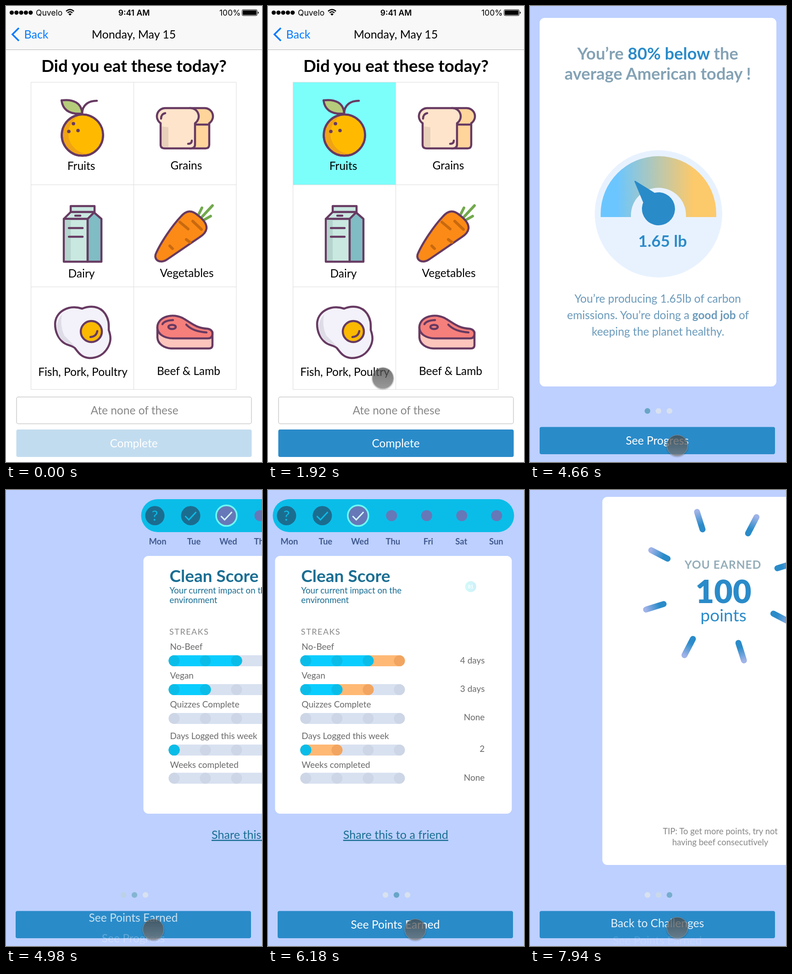
These frames come from a looping animation (558 px wide and 996 px high, 8000 ms). An HTML page:

```html
<!DOCTYPE html>
<html lang="en">
<head>
<meta charset="utf-8">
<title>Food diary</title>
<style>
  html, body { margin: 0; width: 100%; height: 100%; overflow: hidden; background: #fff; }
  svg { display: block; width: 100%; height: 100%; font-family: Lato, sans-serif; }
  .status { font-family: Inter, sans-serif; }
  .icons { stroke: #673a62; stroke-width: 4.5; stroke-linejoin: round; stroke-linecap: round; fill: none; }
</style>
</head>
<body>
<svg id="stage" viewBox="0 0 558 996"></svg>
<script>
const LOOP = 8000, PAGE = 1116;
const BLUE = '#2a8bc9', TEAL = '#1a6e93', CYAN = '#0abde8';

const bold = 'font-weight="700"';
const leftText = (x, y, size, fill, str, extra = '') =>
  `<text x="${x}" y="${y}" font-size="${size}" fill="${fill}" ${extra}>${str}</text>`;
const text = (x, y, size, fill, str, extra = '') =>
  leftText(x, y, size, fill, str, 'text-anchor="middle" ' + extra);
const rect = (x, y, w, h, r, fill, extra = '') =>
  `<rect x="${x}" y="${y}" width="${w}" height="${h}" rx="${r}" fill="${fill}" ${extra}/>`;
const circle = (x, y, r, fill, extra = '') =>
  `<circle cx="${x}" cy="${y}" r="${r}" fill="${fill}" ${extra}/>`;
const path = (d, fill = 'none', extra = '') => `<path d="${d}" fill="${fill}" ${extra}/>`;
const list = (items, draw) => items.map(draw).join('');

const defs = `<defs>
  <linearGradient id="dial"><stop offset=".14" stop-color="#6bc6ff"/><stop offset=".8" stop-color="#fcc96b"/></linearGradient>
  <linearGradient id="ray" gradientUnits="userSpaceOnUse" x1="0" y1="-171" x2="0" y2="-130">
    <stop stop-color="#a0b3e8"/><stop offset=".75" stop-color="${BLUE}"/></linearGradient>
  <linearGradient id="score"><stop stop-color="#5df1e7"/><stop offset="1" stop-color="#53c8ee"/></linearGradient>
  <linearGradient id="touch" x2="0" y2="1"><stop stop-color="#484848"/><stop offset="1" stop-color="#777"/></linearGradient>
  <filter id="shadow" x="-30%" y="-30%" width="160%" height="160%"><feDropShadow dx="0" dy="1" stdDeviation="1.5" flood-opacity=".5"/></filter>
  <clipPath id="fruitClip"><circle cx="166.5" cy="282" r="45"/></clipPath>
</defs>`;

const statusBar = `
  ${rect(0, 0, 558, 95, 0, '#f8f8f8')}${rect(0, 95, 558, 1, 0, '#b2b2b2')}
  ${list([0, 1, 2, 3, 4], i => circle(12.5 + i * 10.3, 14.5, 4.6, '#000'))}
  <g class="status">
    ${leftText(65, 21, 17.5, '#000', 'Quvelo')}
    ${text(279, 21, 17.5, '#000', '9:41 AM', 'font-weight="600"')}
    ${leftText(465, 21, 17.5, '#000', '100%')}
  </g>
  ${path('M131 11.5Q139.5 4 148 11.5M134.2 14.8Q139.5 10.3 144.8 14.8', 'none', 'stroke="#000" stroke-width="2.4"')}
  ${path('M139.5 21L136 17.5Q139.5 14.5 143 17.5Z', '#000')}
  ${rect(514.5, 8, 33, 13, 2.5, 'none', 'stroke="#000"')}${rect(516, 9.5, 30, 10, 1, '#000')}
  ${path('M549 12v5q2-.5 2-2.5t-2-2.5', '#000')}
  ${path('M28 48L14 62L28 76', 'none', 'stroke="#007aff" stroke-width="3.6"')}
  ${leftText(39.5, 71, 25, '#007aff', 'Back')}
  ${text(278.5, 71, 25, '#000', 'Monday, May 15')}`;

const fruit = `
  ${circle(166.5, 282, 45, '#efa315')}
  <g clip-path="url(#fruitClip)" stroke="none">${circle(180, 279, 44, '#ffba00')}</g>
  ${circle(166.5, 282, 45, 'none')}
  ${list([[147, 257], [137, 274], [157, 272]], ([x, y]) => circle(x, y, 3.8, '#673a62', 'stroke="none"'))}
  ${path('M121 206C146 203 165 211 166 235C141 237 124 229 121 206Z', '#b5cc7b')}
  ${path('M166 235C166 216 180 207 198 207')}`;

const bread = `
  ${path('M400 223H432A18 18 0 0 1 443 256V303Q443 311 435 311H400Z', '#ffd59b')}
  ${path('M348 223H402A18 18 0 0 1 412 256V302Q412 311 403 311H346Q337 311 337 303V256A18 18 0 0 1 348 223Z', '#fde4cb')}
  ${path('M340 263V303Q340 308 345 308H354V265Z', '#e9d0bb', 'stroke="none"')}
  ${path('M338 246Q338 236 347 234M397 301Q405 301 405 294M415 259H443')}`;

const milk = `
  ${path('M141 437H193V450H141Z', '#c9e8e0')}
  ${path('M126 465L141 450H193L178 465Z', '#c9e8e0')}
  ${path('M126 465H178V558.5H126Z', '#c9e8e0')}
  ${path('M178 465L192 451L208 465V558.5H178Z', '#80bcc3')}
  ${path('M129 467h12v89h-12Z', '#b4d4cd', 'stroke="none"')}
  ${path('M137 485H167M137 504H167M151 458H162')}`;

const carrot = `
  ${path('M418 459L427 441M424 464L450 436M432 467L446 459', 'none', 'stroke="#72a94c" stroke-width="6"')}
  ${path('M328 538C338 516 362 480 381 460C393 446 405 445 418 457C430 466 438 476 437 486C436 494 430 500 422 505L352 553C336 565 319 554 328 538Z', '#fc8a17')}
  ${path('M379 472L397 487M407 470L426 488M357 524L363 530M393 510L401 516', 'none', 'stroke="#c8690f" stroke-width="6"')}`;

const egg = `
  ${path('M166 661C185 653 205 656 216 672C225 686 224 696 224 708C230 724 228 735 222 746C213 762 198 769 182 769C164 768 157 756 150 747C144 741 134 742 125 735C112 724 107 710 107 694C108 668 136 651 166 661Z', '#f3f1f9')}
  ${path('M122 674C106 690 108 723 127 733Q143 739 152 746Q138 730 127 720Q117 697 122 674Z', '#dedce6', 'stroke="none"')}
  ${circle(186, 711, 23, '#fbb900')}${path('M184 723Q197 722 199 710')}`;

const beef = `
  ${path('M330 702V724C331 739 345 747 360 748H442Q450 748 450 741V712Z', '#fcc6bd')}
  ${path('M330 704C328 682 357 669 384 681C404 692 412 703 440 705Q450 707 450 716Q450 726 440 726H364C344 726 331 716 330 704Z', '#f57f7b')}
  ${path('M341 695Q345 687 364 686M393 696Q407 711 437 713')}
  <ellipse cx="362" cy="701" rx="8" ry="4.5"/>`;

const survey = `<g id="survey">
  ${statusBar}
  ${text(279, 144, 36.7, '#000', 'Did you eat these today?', bold)}
  ${rect(55, 167, 223, 223, 0, '#7cfffb', 'id="picked"')}
  ${path('M54.5 166.5H502V837.5H54.5ZM278.5 167V837M55 390.5H502M55 613.5H502', 'none', 'stroke="#dcdcdc"')}
  <g class="icons">${fruit}${bread}${milk}${carrot}${egg}${beef}</g>
  ${list([[164, 358, 'Fruits'], [393, 357, 'Grains'], [164.5, 593, 'Dairy'], [394, 592, 'Vegetables'],
          [167.5, 808, 'Fish, Pork, Poultry'], [398, 806, 'Beef &amp; Lamb']],
    ([x, y, name]) => text(x, y, 24.5, '#000', name))}
  ${rect(23, 854, 512, 58.5, 4, '#fff', 'stroke="#ccc" stroke-width="1.5"')}
  ${text(280, 892, 24.5, '#878787', 'Ate none of these')}
  ${rect(22.5, 925, 513, 60, 4, '#c2dcef')}${rect(22.5, 925, 513, 60, 4, BLUE, 'id="ready"')}
  ${text(278.5, 964, 24.5, '#fff', 'Complete')}
</g>`;

const result = `<g id="result">
  ${rect(21, 26, 516, 805, 11, '#fff')}
  ${text(278.5, 117, 36.3, '#84a2b5', `You’re <tspan fill="${BLUE}">80% below</tspan> the`, bold)}
  ${text(278.5, 161, 36.3, '#84a2b5', 'average American today !', bold)}
  ${circle(280, 454, 139, '#e8f2ff')}
  ${path('M154 461V454A126 126 0 0 1 406 454V461H340V457A60 60 0 0 0 220 457V461Z', 'url(#dial)')}
  <g id="needle">${path('M-80 -1L-30 -17V17L-80 1Z', BLUE)}${circle(0, 0, 36, BLUE)}</g>
  <g id="verdict">
    ${text(289, 526, 35, BLUE, '1.65 lb', bold)}
    ${text(278.5, 648, 24.5, '#6a9abb', 'You’re producing 1.65lb of carbon')}
    ${text(279, 684, 24.5, '#6a9abb', 'emissions. You’re doing a <tspan font-weight="700">good job</tspan> of')}
    ${text(279, 720, 24.5, '#6a9abb', 'keeping the planet healthy.')}
  </g>
</g>`;

// label, label baseline, bar centre, value, value baseline, days before, days after
const streaks = [
  ['No-Beef', 349, 373, '4 days', 379, 3, 4],
  ['Vegan', 412, 436, '3 days', 441, 2, 3],
  ['Quizzes Complete', 475, 499, 'None', 503, 0, 0],
  ['Days Logged this week', 544, 568, '2', 572, 1, 2],
  ['Weeks completed', 607, 629.5, 'None', 635, 0, 0]
];
const stepX = i => 82 + i * 68;
const steps = (n, y, fill) => list([0, 1, 2, 3].slice(0, n), i => circle(stepX(i), y, 12, fill));

const streakRow = ([label, labelY, y, value, valueY, before, after]) => `
  ${leftText(73, labelY, 19, '#6a6a6a', label)}
  ${rect(70, y - 12, 228, 24, 12, '#d8e1f0')}${steps(4, y, '#cdd6e6')}
  ${after ? `<g class="gain" data-from="${stepX(before - 1)}">
    ${rect(70, y - 12, 24, 24, 12, '#ffb975')}${circle(82, y, 12, '#f2a560')}</g>
    ${rect(70, y - 12, stepX(before - 1) - 58, 24, 12, '#0acdff')}${steps(before, y, CYAN)}` : ''}
  ${leftText(472, valueY, 19, '#6a6a6a', value, 'text-anchor="end"')}`;

const check = (x, color) =>
  path(`M${x - 12} 57L${x - 4} 65L${x + 12} 48`, 'none', `stroke="${color}" stroke-width="3"`);
const days = [['Mon', 46], ['Tue', 125], ['Wed', 200], ['Thu', 272], ['Fri', 349], ['Sat', 421], ['Sun', 497]];

const progress = `<g id="progress">
  ${rect(10, 20, 526, 72, 36, CYAN)}
  ${circle(40, 56, 21, '#1b6d90')}${text(40, 67, 31, CYAN, '?')}
  ${circle(118, 56, 21, '#1b6d90')}${check(118, CYAN)}
  ${circle(196, 56, 22.5, '#6678b8', 'stroke="#6ffaf5" stroke-width="3.5"')}${check(196, '#d5fbff')}
  ${list([269, 345.5, 422, 498], x => circle(x, 56, 12, '#6678b8'))}
  ${list(days, ([day, x]) => text(x, 119, 18.5, '#425a8f', day, bold))}
  ${rect(15, 144, 516, 563, 11, '#fff')}
  ${leftText(72, 201, 37, TEAL, 'Clean Score', bold)}
  ${leftText(72, 226, 18.7, TEAL, 'Your current impact on the')}
  ${leftText(72, 247, 18.7, TEAL, 'environment')}
  <g id="badge">${circle(0, 0, 44, 'url(#score)')}${text(0, 14, 40, '#fff', '81', bold)}</g>
  ${leftText(71.5, 316, 18, '#888', 'STREAKS', 'letter-spacing="1.5"')}
  ${list(streaks, streakRow)}
  ${text(278, 762, 25.2, TEAL, 'Share this to a friend', 'text-decoration="underline"')}
</g>`;

const reward = `<g id="reward">
  ${rect(21, 15, 516, 804, 11, '#fff')}
  <g transform="translate(278.5 210)" stroke="url(#ray)" stroke-width="13" stroke-linecap="round">
    ${list([0, 1, 2, 3, 4, 5, 6, 7], i => path('M0 -170L.01 -130', 'none', `transform="rotate(${-17.5 + i * 45})"`))}
  </g>
  ${text(284, 172, 24.5, '#94adb9', 'YOU EARNED', bold + ' letter-spacing="1"')}
  ${text(285, 247, 70, BLUE, '100', 'font-weight="900"')}
  ${text(285, 287, 37, BLUE, 'points')}
  ${text(278, 752, 18.5, '#888', 'TIP: To get more points, try not')}
  ${text(278, 776, 18.5, '#888', 'having beef consecutively')}
</g>`;

const footer = `<g id="footer">
  ${list([256, 280, 304], x => circle(x, 884.5, 6.2, '#d8e1ef') + circle(x, 884.5, 6.2, '#68a5c8', 'class="dot"'))}
  ${rect(21, 919.5, 513, 59.5, 4, BLUE)}
  ${list(['See Progress', 'See Points Earned', 'Back to Challenges'],
    label => text(277.5, 958, 24.5, '#fff', label, 'class="label"'))}
</g>`;

const cursor = `<g id="cursor" opacity=".75" filter="url(#shadow)">
  ${circle(0, 0, 23, 'url(#touch)', 'stroke="#999"')}</g>`;

const stage = document.getElementById('stage');
stage.innerHTML = defs + rect(0, 0, 558, 996, 0, '#bdd0ff', 'id="sky"') +
  survey + result + progress + reward + footer + cursor;

const part = id => document.getElementById(id);
const all = name => [...stage.querySelectorAll('.' + name)];
const dots = all('dot'), labels = all('label'), gains = all('gain');

const ramp = (t, from, to) => Math.min(1, Math.max(0, (t - from) / (to - from)));
const smooth = p => p * p * (3 - 2 * p);
const settle = (t, start) => t < start ? 0 : 1 - Math.exp((start - t) / 180);
const move = (el, x, y, more = '') => el.setAttribute('transform', `translate(${x} ${y}) ${more}`);
const fade = (el, value) => {
  el.setAttribute('opacity', Math.min(1, Math.max(0, value)));
  el.style.display = value > 0 ? '' : 'none';
};
const track = (t, keys) => {
  const i = keys.findIndex(([time]) => time > t);
  if (i < 0) return keys[keys.length - 1][1];
  if (i === 0) return keys[0][1];
  const [t0, a] = keys[i - 1], [t1, b] = keys[i];
  return a + (b - a) * smooth(ramp(t, t0, t1));
};

const cursorY = [[160, -26], [1040, 257], [1200, 257], [2230, 966], [2490, 966], [2590, 972], [2740, 966],
  [4340, 966], [4440, 972], [4600, 960], [6980, 960], [7100, 964], [7400, 956]];

function draw(t) {
  const opened = settle(t, 2811), second = settle(t, 4735), third = settle(t, 7563);

  fade(part('picked'), smooth(ramp(t, 1200, 1850)));
  fade(part('ready'), smooth(ramp(t, 1200, 1850)));
  fade(part('survey'), 1 - opened * 1.6);
  fade(part('sky'), opened);

  fade(part('result'), opened * 1.25);
  move(part('result'), -PAGE * second, 0);
  move(part('needle'), 280, 443, `rotate(${-10 + 59.6 * smooth(ramp(t, 3130, 4090))})`);
  fade(part('verdict'), smooth(ramp(t, 3050, 3850)));

  move(part('progress'), PAGE * (1 - second - third), 0);
  gains.forEach((gain, i) => {
    const from = +gain.dataset.from, start = 5420 + i * 200;
    const end = from + 68 * smooth(ramp(t, start, start + 360));
    gain.children[0].setAttribute('width', end - 58);
    gain.children[1].setAttribute('cx', end);
  });
  const grown = 1 - (1 - ramp(t, 6100, 6900)) ** 3;
  fade(part('badge'), grown);
  move(part('badge'), 441.5, 211, `scale(${grown})`);

  move(part('reward'), PAGE * (1 - third), 0);

  fade(part('footer'), opened * 1.12);
  move(part('footer'), 0, 70 * (1 - opened));
  const arrived = [1, second, third, 0], drop = [0, 60, 24];
  labels.forEach((label, i) => {
    const shown = arrived[i], gone = arrived[i + 1];
    fade(label, shown * (1 - gone));
    move(label, 0, 40 * gone - drop[i] * (1 - shown));
    fade(dots[i], shown * (1 - gone));
  });

  const x = t < 1200 ? track(t, [[160, -26], [1040, 167]]) : 167 + 154 * ramp(t, 1200, 2230) ** 1.72;
  move(part('cursor'), x, track(t, cursorY));
}

function frame(now) {
  draw(now % LOOP);
  requestAnimationFrame(frame);
}
draw(0);
requestAnimationFrame(frame);
</script>
</body>
</html>
```
